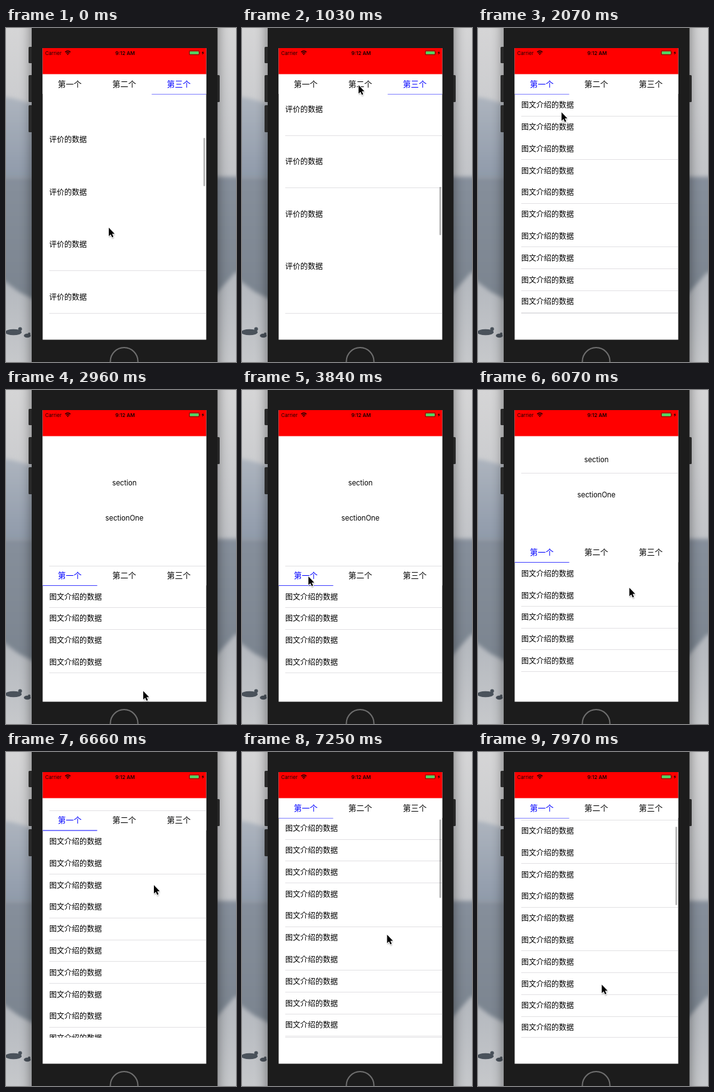
Recreate the animation shown at these times as an HTML page. Size 367x532 px, loop 8 s.

```html
<!DOCTYPE html>
<html lang="zh">
<head>
<meta charset="utf-8">
<title>Nested scroll</title>
<style>
html, body { margin: 0; width: 100%; height: 100%; overflow: hidden; background: #1c1c1c; }
svg { display: block; width: 367px; height: 532px; }
text { font-family: "Noto Sans CJK SC", "Noto Sans CJK", sans-serif; font-size: 12px; fill: #000; }
.tab { font-size: 12.6px; text-anchor: middle; }
.tab.on { fill: #00f; }
.latin { font-family: Inter, Roboto, sans-serif; font-size: 11.3px; text-anchor: middle; }
.status { font-family: Inter, Roboto, sans-serif; font-size: 8px; fill: #1a0000; }
</style>
</head>
<body>
<svg viewBox="0 0 367 532">
  <defs>
    <linearGradient id="sky" x2="0" y2="1">
      <stop offset="0" stop-color="#d5d5d6"/>
      <stop offset=".44" stop-color="#c2c4c8"/>
      <stop offset=".75" stop-color="#b4b8be"/>
      <stop offset="1" stop-color="#c6c8cb"/>
    </linearGradient>
    <linearGradient id="hill" x2="0" y2="1">
      <stop offset="0" stop-color="#adb4be"/>
      <stop offset="1" stop-color="#8f9aaa"/>
    </linearGradient>
    <linearGradient id="lake" x2="0" y2="1">
      <stop offset="0" stop-color="#868f9b"/>
      <stop offset="1" stop-color="#7b848f"/>
    </linearGradient>
    <filter id="blur" x="-20%" width="140%"><feGaussianBlur stdDeviation="9"/></filter>
    <filter id="haze" x="-20%" width="140%"><feGaussianBlur stdDeviation="3"/></filter>
    <filter id="soft" x="-50%" y="-50%" width="200%" height="200%"><feGaussianBlur stdDeviation=".9"/></filter>
    <clipPath id="table"><rect x="58.5" y="73.5" width="261" height="381.5"/></clipPath>
    <path id="arrow" d="M0 0V13.6L3.1 10.7 5.3 15.6 7.4 14.6 5.2 9.8H9.3Z"/>
  </defs>

  <rect width="367" height="532" fill="url(#sky)"/>
  <path d="M-20 110Q10 106 60 130V240H-20z" fill="url(#hill)" filter="url(#haze)"/>
  <path d="M-20 237H60V440L20 420L-20 390z" fill="url(#lake)" filter="url(#haze)"/>
  <path d="M320 237H390V385L365 390L320 440z" fill="url(#lake)" filter="url(#haze)"/>
  <g fill="#4a525b">
    <ellipse cx="12" cy="484.5" rx="13" ry="4.8"/>
    <circle cx="22.5" cy="479.5" r="3"/>
    <ellipse cx="34" cy="490" rx="5.5" ry="3.2"/>
    <circle cx="37" cy="487" r="2"/>
  </g>
  <rect x="39" y="-20" width="300" height="580" opacity=".4" filter="url(#blur)"/>

  <g fill="#292929">
    <rect x="36" y="30" width="8" height="26" rx="1.5"/>
    <rect x="36" y="75" width="8" height="43" rx="1.5"/>
    <rect x="36" y="123" width="8" height="43" rx="1.5"/>
    <rect x="333" y="75" width="8" height="43" rx="1.5"/>
  </g>
  <rect x="41" y="-10" width="296.5" height="560" fill="#1c1c1c"/>
  <circle cx="188.5" cy="531" r="22" fill="none" stroke="#6e6e6e" stroke-width="2"/>
  <rect x="58.5" y="32" width="261" height="464.5" fill="#fff"/>

  <g clip-path="url(#table)">
    <g id="page">
      <g id="intro"></g>
      <g id="review"></g>
      <rect x="58" y="-400" width="262" height="505" fill="#fff"/>
      <text class="latin" x="189" y="-54.3">section</text>
      <text class="latin" x="189" y="1.4">sectionOne</text>
      <g id="tabs"></g>
    </g>
    <g id="lines"></g>
    <rect id="bar" x="315.3" width="2.1" rx="1" opacity=".36"/>
  </g>

  <rect x="58.5" y="32" width="261" height="41.5" fill="#f00"/>
  <text class="status" x="62.5" y="42.5">Carrier</text>
  <g fill="none" stroke="#1a0000" stroke-width="1.4">
    <path d="M94.4 38.4q4.2-3.6 8.4 0"/>
    <path d="M96 40.3q2.6-2.2 5.2 0"/>
  </g>
  <path d="M97.2 41.6q1.4-1 2.8 0l-1.4 1.6z" fill="#1a0000"/>
  <text class="status" x="190" y="42.5" text-anchor="middle" font-weight="600">9:12 AM</text>
  <rect x="292.4" y="36.3" width="16" height="6.4" rx="1.3" fill="none" stroke="#400" stroke-width=".7"/>
  <rect x="293.3" y="37.2" width="14.2" height="4.6" rx=".6" fill="#4cd964"/>
  <path d="M309.2 38.4q1.2 1.1 0 2.2z" fill="#400"/>
  <path d="M314.9 36.2l-2.7 3.8h1.7l-.7 3 2.8-3.9h-1.7z" fill="#1a0000"/>

  <g id="cursor">
    <use href="#arrow" x=".5" y="2" opacity=".5" filter="url(#soft)"/>
    <use href="#arrow" stroke="#fff" stroke-width="1.8" stroke-linejoin="round" paint-order="stroke"/>
  </g>
</svg>
<script>
const NS = "http://www.w3.org/2000/svg";
const $ = id => document.getElementById(id);
const UNIT = 464 / 1334;      // stage pixels per device pixel
const TOP = 32.5, HEAD = 120, LIST = 210, FOOT = 1213;
const LOOP = 8000, STEP = 147.7;

// The pointer's stops: [step, x, y]
const stops = [
  [0, 164, 318], [7, 186, 91], [10, 186, 91], [13, 110, 92], [16, 200, 255], [20, 219, 479.5],
  [24, 190, 296], [26, 106, 297], [29, 221, 386], [31, 221, 399], [35, 244.5, 308.5],
  [37, 244, 375], [41, 241.5, 315], [45, 236, 212], [49, 231.5, 291], [54, 197.5, 370.5]
];

const part = (n, a, b) => Math.min(1, Math.max(0, (n - a) / (b - a)));
const smooth = p => p * p * (3 - 2 * p);
const easeOut = p => 1 - (1 - p) ** 2;
const hump = p => Math.sin(Math.PI * p);

function pointer(n) {
  const i = Math.max(1, stops.findIndex(s => s[0] >= n));
  const [a, x0, y0] = stops[i - 1], [b, x1, y1] = stops[i];
  const p = smooth(part(n, a, b));
  return [x0 + (x1 - x0) * p, y0 + (y1 - y0) * p];
}

// Outer page: pulled open, stretched past its end, then flicked shut
function pullAt(n) {
  const open = smooth(part(n, 16, 20)) - smooth(part(n, 39, 46.42));
  return Math.round(593 * open + 297 * hump(part(n, 33, 39)) + 18 * hump(part(n, 50, 54)));
}

// Inner list
function scrollAt(n) {
  if (n < 10) return Math.round(872 + 1099 * easeOut(part(n, 0, 7)));
  return n < 47 ? 0 : Math.round(3 + 89 * easeOut(part(n, 49, 53)));
}

function tabAt(n) {
  if (n < 10) return 2;
  return n < 14 || (n > 23 && n < 26) ? 1 : 0;
}

function add(parent, tag, attrs, label) {
  const el = document.createElementNS(NS, tag);
  for (const name in attrs) el.setAttribute(name, attrs[name]);
  if (label) el.textContent = label;
  return parent.appendChild(el);
}

function fillList(id, label, pitch, count) {
  for (let i = 0; i < count; i++) {
    add($(id), "text", { x: 69, y: TOP + (LIST + pitch * (i + .5)) * UNIT + 4.4 }, label);
  }
}
fillList("intro", "图文介绍的数据", 100, 12);
fillList("review", "评价的数据", 240, 6);

const tabs = ["第一个", "第二个", "第三个"].map((label, i) =>
  add($("tabs"), "text", { class: "tab", x: 101.7 + 87 * i, y: 93.6 }, label));

const addLines = (count, attrs) => Array.from({ length: count }, () =>
  add($("lines"), "rect", { height: .5, ...attrs }));
const rules = addLines(16, { x: 69, width: 250.5, fill: "#c4c3c8" });
const marks = addLines(2, { width: 87, fill: "#00f" });

const move = (el, x, y) => el.setAttribute("transform", `translate(${x} ${y})`);
const show = (el, on) => { el.style.display = on ? "" : "none"; };

// The screen is sampled every half pixel, so some one-row lines drop out.
function placeLine(el, row) {
  const a = row * UNIT * 2 - .5, hit = Math.ceil(a);
  show(el, hit - a < UNIT * 2);
  el.setAttribute("y", TOP + hit / 2);
}

function draw(n) {
  const pull = pullAt(n), scroll = scrollAt(n), tab = tabAt(n);
  const review = tab === 2;
  const pitch = review ? 240 : 100;
  const shift = scroll % pitch;

  move($("page"), 0, pull * UNIT);
  show($("intro"), !review);
  show($("review"), review);
  move($(review ? "review" : "intro"), 0, -shift * UNIT);
  tabs.forEach((t, i) => t.classList.toggle("on", i === tab));
  marks.forEach((el, i) => {
    el.setAttribute("x", 58.5 + 87 * tab);
    placeLine(el, LIST - 2 + i + pull);
  });

  const rows = [HEAD - 1, HEAD - 321, FOOT];
  for (let r = LIST - 1 + pitch - shift; r < FOOT; r += pitch) rows.push(r);
  rules.forEach((el, i) => i < rows.length ? placeLine(el, rows[i] + pull) : show(el, false));

  const off = scroll * UNIT, bar = $("bar");
  show(bar, n < 10 || n > 45);
  bar.setAttribute("y", (review ? 113.2 + off * .204 : 107.2 + off * .37) + pull * UNIT);
  bar.setAttribute("height", review ? 77 : 125);

  move($("cursor"), ...pointer(n));
}

function tick() {
  draw(Math.floor((performance.now() % LOOP + 8) / STEP));
  requestAnimationFrame(tick);
}
tick();
</script>
</body>
</html>
```
